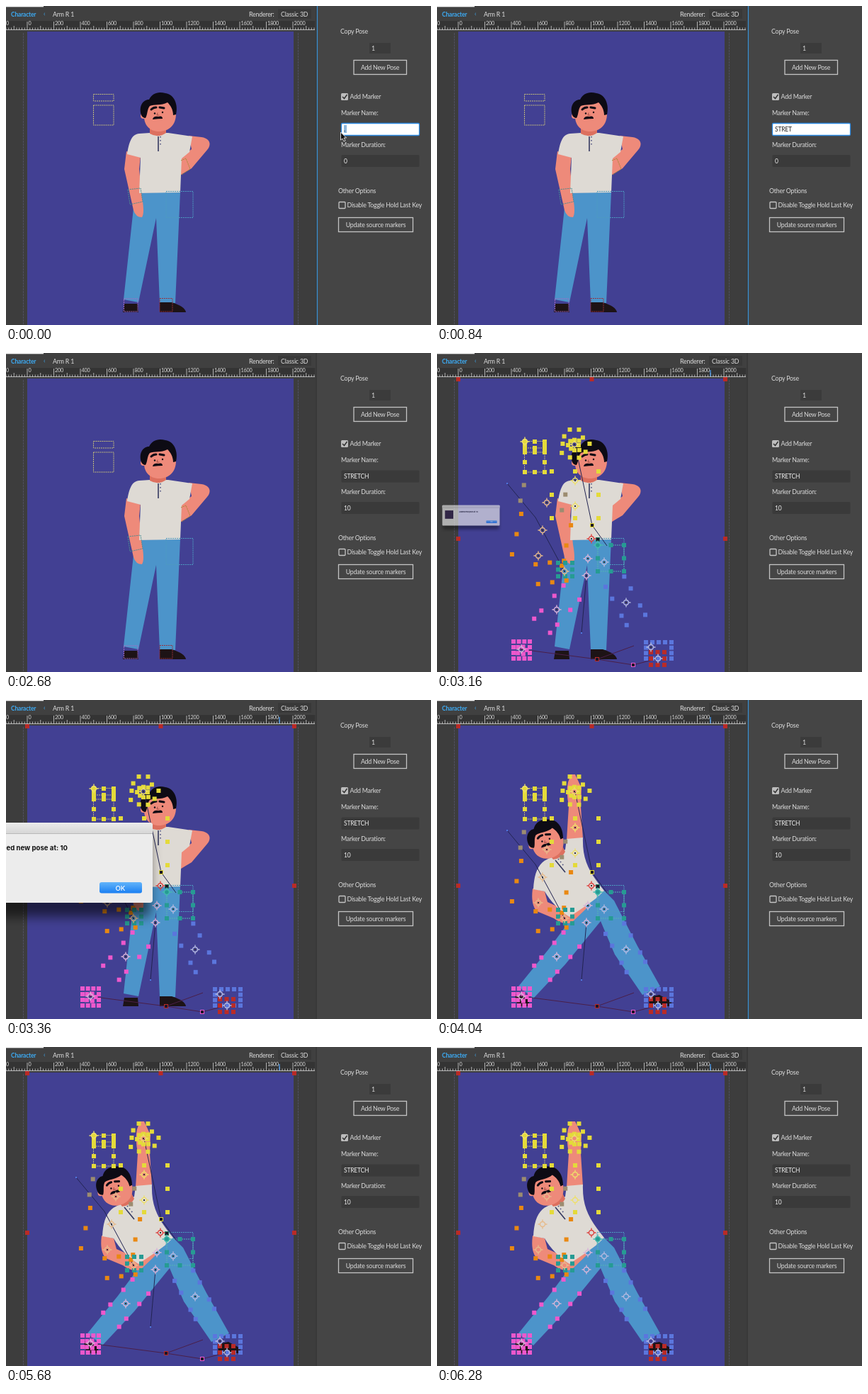
An HTML page for the animation above (6.32 s loop, 600 by 450 pixels).

```html
<!DOCTYPE html>
<html lang="en">
<head>
<meta charset="utf-8">
<title>Pose marker demo</title>
<style>
  html, body { margin: 0; width: 100%; height: 100%; overflow: hidden; background: #444; }
  svg { display: block; width: 600px; height: 450px; }
  text { font: 8.8px Lato, "Open Sans", sans-serif; letter-spacing: -.2px; fill: #dcdcdc; white-space: pre; }
  .mid { text-anchor: middle; }
  .ruler { font-size: 7.3px; fill: #d8d8d8; }
  .button { fill: none; stroke: #c4c4c4; stroke-width: 1.3; }
  .box { fill: none; stroke-dasharray: 2 1; }
  .field rect { fill: #3a3a3a; }
  .field .sel { fill: none; }
  .field.on rect { fill: #fff; stroke: #2d8ae2; stroke-width: 1.3; }
  .field.on .sel { fill: none; stroke: none; }
  .field.on .sel.picked { fill: #8db7dc; }
  .field text { fill: #eee; font-size: 8.5px; }
  .field.on text { fill: #222; }
  .skin { fill: #ee8a7a; }
  .shirt { fill: #dedad4; }
  .pants { fill: #4c94ca; }
  .shoe { fill: #1d1316; }
  .dark { fill: #0d0b14; }
  .line { fill: none; stroke: #0d0b14; stroke-linecap: round; }
  .alert text { font: bold 9.6px Inter, "Liberation Sans", sans-serif; fill: #111; letter-spacing: 0; }
</style>
</head>
<body>
<svg viewBox="0 0 600 450">
  <defs>
    <linearGradient id="blue" x2="0" y2="1">
      <stop stop-color="#62b4fa"/><stop offset="1" stop-color="#1a7ff2"/>
    </linearGradient>
    <linearGradient id="bar" x2="0" y2="1">
      <stop stop-color="#ececec"/><stop offset="1" stop-color="#d6d6d6"/>
    </linearGradient>
    <filter id="blur" x="-20%" y="-30%" width="140%" height="180%"><feGaussianBlur stdDeviation="8"/></filter>
    <g id="head">
      <path class="skin" d="M196 141C198 133 208 130 218 131C232 132 239 142 240 152C240 168 230 177 216 177C203 177 195 168 195 156Z"/>
      <circle class="skin" cx="194" cy="155" r="4"/>
      <path class="dark" d="M191 154C187 142 193 132 202 132C206 123 215 120 225 123C238 125 243 139 240 153L236 154C236 146 232 140 228 136C219 141 209 138 203 141C199 146 200 153 197 158Q193 158 191 154Z"/>
      <path class="line" stroke-width="3" d="M205 146Q208 143 212 143M217 143L223 144"/>
      <circle class="dark" cx="210" cy="151.5" r="1.2"/><circle class="dark" cx="221" cy="150" r="1.2"/>
      <path class="line" style="stroke:#a34d45" d="M214 151L213 154L216 154"/>
      <path class="dark" d="M207 160Q208 155 215 156Q221 154 221 159Q215 159 207 160Z"/>
    </g>
  </defs>

  <rect width="600" height="450" fill="#3d3d3d"/>
  <rect x="30" y="36" width="376" height="414" fill="#424093"/>
  <path stroke="#504f62" stroke-dasharray="3 1" d="M24.5 38V450M412.5 38V450"/>
  <rect width="438" height="21" fill="#404040"/>
  <rect width="53" height="1.3" fill="#fff"/>
  <text x="7" y="14.5" style="font-weight:bold;font-size:8.5px;fill:#3caaf3">Character</text>
  <text x="53" y="14" style="fill:#3caaf3">‹</text>
  <text x="66" y="14.5">Arm R 1</text>
  <text x="343" y="14.5">Renderer:</text>
  <rect x="384" y="4" width="47" height="14" fill="#393939"/>
  <text x="388" y="14.5">Classic 3D</text>
  <g id="ruler"><rect y="21" width="436" height="13" fill="#343434"/></g>

  <rect x="439" width="161" height="450" fill="#454545"/>
  <rect x="437" width="2" height="450" fill="#393939"/>
  <rect id="focusLine" x="438.8" width="1.3" height="450" fill="#3a8fd0"/>
  <text x="472" y="38.5">Copy Pose</text>
  <rect x="513" y="52" width="30" height="15" fill="#3b3b3b"/><text x="516" y="63">1</text>
  <rect class="button" x="491" y="76.5" width="74.5" height="20"/><text class="mid" x="528" y="89.7">Add New Pose</text>
  <rect x="473" y="123" width="10" height="10" rx="1.5" fill="#bdbdbd"/>
  <path d="M475 128L477.5 130.5L481.5 125" fill="none" stroke="#333" stroke-width="1.5"/>
  <text x="485.5" y="131">Add Marker</text>
  <text x="473" y="154">Marker Name:</text>
  <g class="field" id="nameField">
    <rect x="473.5" y="165.5" width="110" height="17" rx="1.5"/><rect class="sel" x="477" y="168" width="4" height="11"/><text x="477" y="177"/>
  </g>
  <text x="473" y="199">Marker Duration:</text>
  <g class="field" id="timeField">
    <rect x="473.5" y="210" width="110" height="17" rx="1.5"/><rect class="sel" x="477" y="213" width="5" height="11"/><text x="477" y="221.5"/>
  </g>
  <text x="469" y="263.5">Other Options</text>
  <rect class="button" x="470" y="276.5" width="9" height="9" rx="1"/><text x="481.5" y="284">Disable Toggle Hold Last Key</text>
  <rect class="button" x="469.5" y="298.5" width="105" height="20"/><text class="mid" x="522" y="312">Update source markers</text>

  <g id="standing">
    <path class="skin" d="M258 183L276 185C289 187 290 196 284 203L262 229L247 238L246 214L262 202Z"/>
    <path class="pants" d="M182 264L246 262L239 419H217L212 299L187 418L166 414L180 285Z"/>
    <path class="shoe" d="M167 420H186L187 432H165ZM217 418H234Q253 424 254 432H217Z"/>
    <path class="skin" d="M170 205L190 211L188 230L192 270Q196 292 192 298Q183 298 180 288L167 230Z"/>
    <path class="shirt" d="M203 179L229 179L263 184L259 206L248 215L246 263L188 264L190 214L171 209C174 190 178 181 188 180Z"/>
    <path fill="#dd705f" d="M203 170H226V179Q215 187 203 180Z"/>
    <use href="#head"/>
    <path stroke="#34385f" stroke-width="1.6" d="M215 184V205"/>
    <path stroke="#44477a" stroke-width="1.5" stroke-dasharray="1.5 3.5" d="M218 184V196"/>
  </g>
  <g id="stretched">
    <path class="shoe" d="M111 415L128 419L131 432H116Q109 425 111 415ZM299 419L314 416L331 425V432H300Z"/>
    <path class="pants" d="M236 269L250 283L283 347L315 404L290 416L251 359L231 312L181 373L136 421L115 404L158 351L190 308L205 288Z"/>
    <path class="skin" d="M183 198L186 150Q182 128 185 116L189 105H195L204 124L203 150L206 196Z"/>
    <path class="skin" d="M135 266L152 270L156 285L185 298L207 287L211 294L190 314Q178 318 165 308L141 298Q132 289 135 266Z"/>
    <path class="shirt" d="M183 196L206 194C205 225 214 242 236 269C221 285 201 296 187 306C174 298 160 284 152 270L136 267C137 243 144 230 155 225L181 211Z"/>
    <path fill="#dd705f" d="M157 216L177 206L181 214Q177 223 164 225Z"/>
    <use href="#head" transform="translate(153 197) rotate(-12) translate(-215 -150)"/>
    <path stroke="#34385f" stroke-width="1.6" d="M167 226L181 243"/>
    <path stroke="#44477a" stroke-width="1.5" stroke-dasharray="1.5 3.5" d="M171 224L179 234"/>
  </g>

  <path class="box" stroke="#c3bd7b" d="M123.5 124.5H152V134H123.5ZM123.5 140H152V168H123.5Z"/>
  <path class="box" stroke="#4d9ac0" d="M226 261.5H264V298.5H226Z"/>
  <g id="guides">
    <path class="box" stroke="#4b8b91" d="M172 259L190 257L193 276L175 280Z"/>
    <path class="box" stroke="#a66bc6" d="M166.5 413H186V431H166.5Z"/>
    <path class="box" stroke="#97313d" d="M217 412.5H235V431H217Z"/>
    <path class="box" stroke="#a58737" d="M247 218L254 215L260 230L248 238"/>
  </g>

  <g id="markers">
    <path stroke="#4b9cf0" stroke-width="1.3" d="M386 24V33"/>
    <path class="box" stroke="#52b4b4" d="M227 271H264V308H227Z"/>
    <g id="paths">
      <path fill="none" stroke="#222452" d="M99 184L139 232L180 308M195 130L219 243L240 272M211 314L204 395"/>
      <path fill="none" stroke="#4a1f48" d="M119 418L226 432L278 413M226 432L277 440L312 431"/>
      <path fill="#4f78e0" d="M98 183h2v2h-2zM203 394h2v2h-2z"/>
    </g>
  </g>

  <path id="cursor" fill="#111" stroke="#fff" stroke-width=".8" d="M472.5 178V189L475 187L477 191L479 190L477 186H480.5Z"/>

  <g id="alert" class="alert">
    <rect x="-108" y="190" width="312" height="116" rx="6" fill="#000" opacity=".55" filter="url(#blur)"/>
    <rect x="-111" y="173" width="318" height="113" rx="4" fill="#ececec"/>
    <path fill="url(#bar)" d="M-111 188V177Q-111 173 -107 173H203Q207 173 207 177V188Z"/>
    <path stroke="#b9b9b9" d="M-111 188.5H207"/>
    <rect x="-96" y="202" width="46" height="46" fill="#2c1b4c"/>
    <text x="87" y="212" text-anchor="end">Added new pose at: 10</text>
    <rect x="132" y="257" width="60" height="15.5" rx="3" fill="url(#blue)"/>
    <text class="mid" x="161.5" y="268.5" style="fill:#fff;font-weight:500">OK</text>
  </g>
</svg>
<script>
const LOOP = 6320;
const $ = id => document.getElementById(id);

function add(parent, tag, attrs, text = "") {
  const el = document.createElementNS("http://www.w3.org/2000/svg", tag);
  for (const key in attrs) el.setAttribute(key, attrs[key]);
  el.textContent = text;
  return parent.appendChild(el);
}

// Ruler: one tick per 20 units, labels every 200
let ticks = "M0 33.5H436";
for (let i = -8; i <= 108; i++) {
  const x = 30 + i * 3.75;
  ticks += `M${x} 34V${i % 10 == 0 ? 22 : i % 5 == 0 ? 28 : 30.5}`;
  if (i % 10 == 0) add($("ruler"), "text", { x: x + 1.5, y: 27, class: "ruler" }, i * 20);
}
add($("ruler"), "text", { x: 0, y: 27, class: "ruler" }, "0");
add($("ruler"), "path", { d: ticks, stroke: "#d2d2d2", "stroke-width": .8 });

const YELLOW = "#e4da3a", TAN = "#9c8c70", ORANGE = "#e98812", TEAL = "#269b93",
      BLUE = "#5b76dd", PINK = "#ee58cc", RED = "#b92b27";

let seed = 7;
const jitter = size => ((seed = seed * 16807 % 2147483647) / 2147483647 - .5) * size;

const dot = (color, x, y) =>
  add($("markers"), "rect", { x: x - 3, y: y - 3, width: 6, height: 6, fill: color });

// Dots around the edge of a box
function frameDots(color, x0, y0, x1, y1, cols = 2, rows = 2) {
  for (let i = 0; i <= cols; i++)
    for (let j = 0; j <= rows; j++)
      if (i % cols == 0 || j % rows == 0)
        dot(color, x0 + (x1 - x0) * i / cols, y0 + (y1 - y0) * j / rows);
}

function ringDots(color, x, y, r, n) {
  for (let i = 0; i < n; i++) {
    const angle = i / n * 2 * Math.PI, size = r + jitter(r / 2);
    dot(color, x + size * Math.cos(angle), y + size * Math.sin(angle));
  }
}

// Pairs of dots on both sides of a bone
function boneDots(color, [x0, y0], [x1, y1], half, steps) {
  const dx = x1 - x0, dy = y1 - y0, length = Math.hypot(dx, dy);
  for (const s of steps)
    for (const side of [-half, half])
      dot(color, x0 + dx * s - dy / length * side, y0 + dy * s + dx / length * side);
}

frameDots(RED, 30, 37, 407, 487);
frameDots(YELLOW, 124, 125, 152, 134);
frameDots(YELLOW, 124, 140, 152, 168);
frameDots(YELLOW, 162, 167, 228, 233);
ringDots(YELLOW, 194, 130, 8, 8);
ringDots(YELLOW, 194, 128, 19, 10);
boneDots(TAN, [152, 193], [147, 215], 30, [0, 1]);
boneDots(ORANGE, [154, 235], [141, 292], 36, [0, .5, 1]);
boneDots(ORANGE, [141, 312], [181, 307], 14, [0, .5, 1]);
frameDots(TEAL, 227, 271, 264, 308);
frameDots(TEAL, 171, 296, 191, 315);
const legSteps = [.23, .37, .57, .68];
boneDots(PINK, [211, 314], [119, 418], 15, legSteps);
boneDots(BLUE, [236, 295], [302, 415], 15, legSteps);
frameDots(PINK, 108, 407, 131, 431, 3, 3);
ringDots(PINK, 120, 419, 6, 5);
frameDots(BLUE, 295, 408, 331, 431, 4, 3);
frameDots(RED, 302, 422, 321, 440);

function pin(color, x, y) {
  add($("markers"), "path", {
    d: `M${x - 3.5} ${y}a3.5 3.5 0 1 0 7 0a3.5 3.5 0 1 0 -7 0M${x - 6.5} ${y}h3m7 0h3M${x} ${y - 6.5}v3m0 7v3`,
    fill: "none", stroke: color, "stroke-width": 1.4
  });
  add($("paths"), "rect", { x: x - 1, y: y - 1, width: 2, height: 2, fill: "#333" });
}

// Joints of each limb, from root to tip
const limbs = {
  "#eee06a": [[124, 125], [195, 216], [195, 180], [194, 129]],
  "#e7bb8b": [[155, 211], [149, 250], [143, 286], [180, 308]],
  "#d9b5d8": [[213, 290], [211, 314], [169, 362], [119, 418]],
  "#b4b9e0": [[236, 295], [267, 352], [302, 415], [312, 431]],
  "#dc4340": [[218, 262]],
  "#43bbb0": [[227, 271]]
};
for (const color in limbs)
  for (const [x, y] of limbs[color]) pin(color, x, y);

function handle(color, x, y) {
  add($("paths"), "rect", { x: x - 2.5, y: y - 2.5, width: 5, height: 5, fill: "#1b1527", stroke: color });
}
handle(YELLOW, 219, 243);
handle("#277d63", 227, 263);
handle(RED, 226, 432);
handle(PINK, 277, 440);

function setField(id, value, on, picked) {
  const field = $(id);
  field.classList.toggle("on", on);
  field.querySelector(".sel").classList.toggle("picked", picked);
  field.querySelector("text").textContent = value;
}

const show = (id, on) => $(id).style.display = on ? "" : "none";
const clamp = v => Math.min(1, Math.max(0, v));

function draw(t) {
  const typed = Math.floor((t - 280) / 120) + 1;
  setField("nameField", typed > 0 ? "STRETCH".slice(0, typed) : ".", t < 1280, typed <= 0);
  setField("timeField", t < 1480 ? "0" : t < 1600 ? "1" : "10", t >= 1280 && t < 2680, t >= 1280 && t < 1480);
  show("cursor", typed <= 0);

  const selected = t >= 2720, posed = t >= 3800;
  show("guides", !selected);
  show("markers", selected);
  show("paths", t < 5960);
  show("standing", !posed);
  show("stretched", posed);
  show("focusLine", t < 2680 || (t >= 3820 && t < 4800));

  const grow = clamp((t - 3110) / 200);
  show("alert", grow > 0 && !posed);
  $("alert").setAttribute("transform", `translate(48 229) scale(${grow}) translate(-48 -229)`);
  $("alert").setAttribute("opacity", clamp(.4 + grow) * clamp((3800 - t) / 120));
}

const start = performance.now();
(function frame() {
  draw((performance.now() - start) % LOOP);
  requestAnimationFrame(frame);
})();
</script>
</body>
</html>
```
